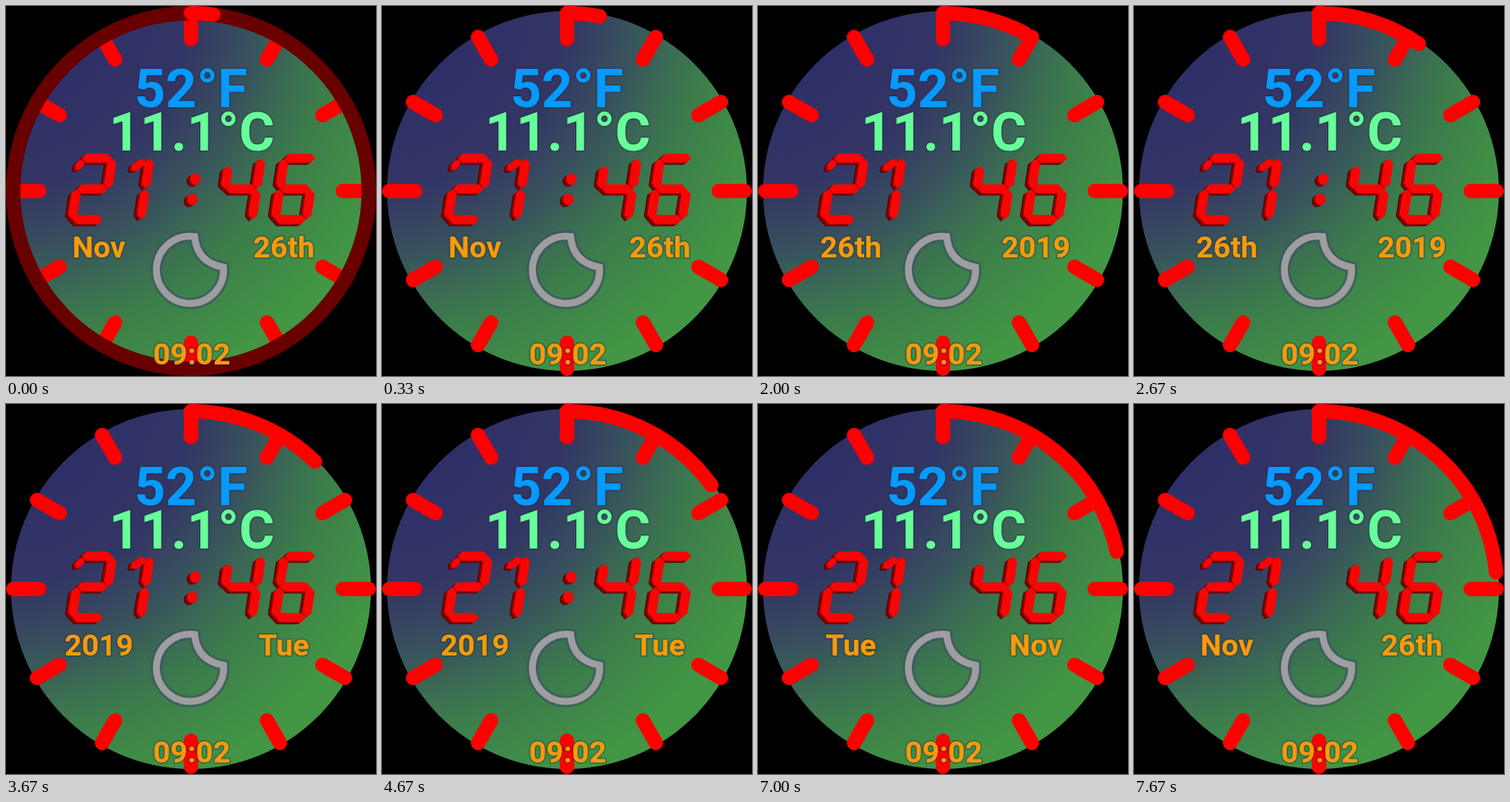
Recreate the animation shown at these times as an HTML page. Size 512 px wide and 512 px high, loop 8 s.

```html
<!DOCTYPE html>
<html lang="en">
<head>
<meta charset="utf-8">
<title>Watch face</title>
<style>
html, body { margin: 0; width: 100%; height: 100%; overflow: hidden; background: #000; }
svg { display: block; width: 100vw; height: 100vh; }
text {
  font: 700 41.5px Roboto, Arial, sans-serif; text-anchor: middle; fill: #f99a08;
  paint-order: stroke; stroke: #24304a; stroke-opacity: .35; stroke-width: 4px; stroke-linejoin: round;
}
.big { font-size: 75px; }
.bar { fill: none; stroke: #f00; stroke-width: 20; stroke-linecap: round; }
</style>
</head>
<body>
<svg viewBox="0 0 512 512">
  <defs>
    <radialGradient id="sky" gradientUnits="userSpaceOnUse" cx="0" cy="0" r="640">
      <stop offset=".2" stop-color="#2f2f68"/>
      <stop offset=".4" stop-color="#333664"/>
      <stop offset=".53" stop-color="#38505d"/>
      <stop offset=".6" stop-color="#3a6456"/>
      <stop offset=".7" stop-color="#3c7c4b"/>
      <stop offset=".9" stop-color="#429644"/>
    </radialGradient>
  </defs>
  <rect width="512" height="512"/>
  <circle cx="256" cy="256" r="249" fill="url(#sky)"/>
  <path id="ticks" class="bar"/>
  <circle cx="256" cy="256" r="246" id="ring" fill="none" stroke="#680000" stroke-width="20"/>
  <path id="arc" class="bar"/>
  <g fill="none" stroke-linejoin="miter">
    <path id="halo" stroke="#3d5068" stroke-width="16" opacity=".6"/>
    <path id="moon" stroke="#9f9da0" stroke-width="9.5"/>
  </g>
  <g id="clock"></g>
  <g id="colon"></g>
  <text class="big" x="256" y="139.5" style="fill:#069aff">52°F</text>
  <text class="big" x="257" y="200" style="fill:#66ff98">11.1°C</text>
  <text id="left" x="128.5" y="348"></text>
  <text id="right" x="384.5" y="348"></text>
  <text x="257" y="496">09:02</text>
</svg>
<script>
const $ = id => document.getElementById(id);
const LOOP = 8000;
const DATE = ['Nov', '26th', '2019', 'Tue'];

// Point on the dial; 0 degrees is at twelve o'clock.
function polar(r, deg) {
  const a = deg * Math.PI / 180;
  return (256 + r * Math.sin(a)).toFixed(2) + ' ' + (256 - r * Math.cos(a)).toFixed(2);
}

// Slanted bar with pointed ends.
function bar([x1, y1], [x2, y2], gap = 1.5, half = 5.5) {
  const len = Math.hypot(x2 - x1, y2 - y1);
  const ux = (x2 - x1) / len, uy = (y2 - y1) / len;
  const at = (along, side) =>
    (x1 + ux * along - uy * side).toFixed(1) + ' ' + (y1 + uy * along + ux * side).toFixed(1);
  const a = gap, b = len - gap;
  return 'M' + [at(a, 0), at(a + half, half), at(b - half, half),
    at(b, 0), at(b - half, -half), at(a + half, -half)].join('L') + 'Z';
}

// Each segment joins two corners given as [column, row].
const SEGMENTS = {
  a: [[0, 0], [1, 0]], b: [[1, 0], [1, 1]], c: [[1, 1], [1, 2]],
  d: [[0, 2], [1, 2]], e: [[0, 1], [0, 2]], f: [[0, 0], [0, 1]],
  g: [[0, 1], [1, 1]]
};

function digit(x, names) {
  const corner = ([col, row]) => [x + col * 43 + (1 - row) * 6.5, 210.5 + row * 42.5];
  return [...names].map(n => bar(...SEGMENTS[n].map(corner))).join('');
}

// Bright faces over a dark extruded edge.
function raised(d) {
  const layer = (shift, color) =>
    `<path d="${d}" transform="translate(${-shift} ${shift * 0.6})" fill="${color}" ` +
    `stroke="${color}" stroke-width="1.5" stroke-linejoin="round"/>`;
  return layer(5, '#5c0608') + layer(3.5, '#740505') + layer(2, '#900404') + layer(0, '#f80606');
}

function dot(x, y) {
  return `M${x - 6.5} ${y}a6.5 7 0 1 0 13 0a6.5 7 0 1 0 -13 0Z`;
}

function build() {
  let d = '';
  for (let deg = 0; deg < 360; deg += 30) d += `M${polar(210, deg)}L${polar(246, deg)}`;
  $('ticks').setAttribute('d', d);

  const moon = 'M261 319A46.5 46.5 0 1 0 301 361.5Q264 355 261 319Z';
  $('moon').setAttribute('d', moon);
  $('halo').setAttribute('d', moon);

  $('clock').innerHTML = raised(
    digit(98, 'abged') + bar([97, 226], [107, 214], 0, 4) +
    digit(150, 'bc') + bar([173, 227], [193, 213], 1, 4.5) +
    digit(304, 'bcg') + bar([308, 221], [303, 253], 1) +
    digit(379, 'afgedc'));
  $('colon').innerHTML = raised(dot(262, 239.5) + dot(258, 267.5));
}

function draw(ms) {
  const step = Math.floor((ms % LOOP + 4) * 3 / 1000) % 24;
  const sec = 1.2 + step * 0.5608;
  $('arc').setAttribute('d', `M${polar(246, 0)}A246 246 0 0 1 ${polar(246, sec * 6)}`);
  $('ring').style.display = step === 0 ? '' : 'none';
  $('colon').style.display = Math.floor(sec) % 2 ? '' : 'none';
  const page = Math.floor((sec - 1) / 3) % 4;
  $('left').textContent = DATE[page];
  $('right').textContent = DATE[(page + 1) % 4];
}

build();
const start = performance.now();
function tick() {
  draw(performance.now() - start);
  requestAnimationFrame(tick);
}
tick();
</script>
</body>
</html>
```
